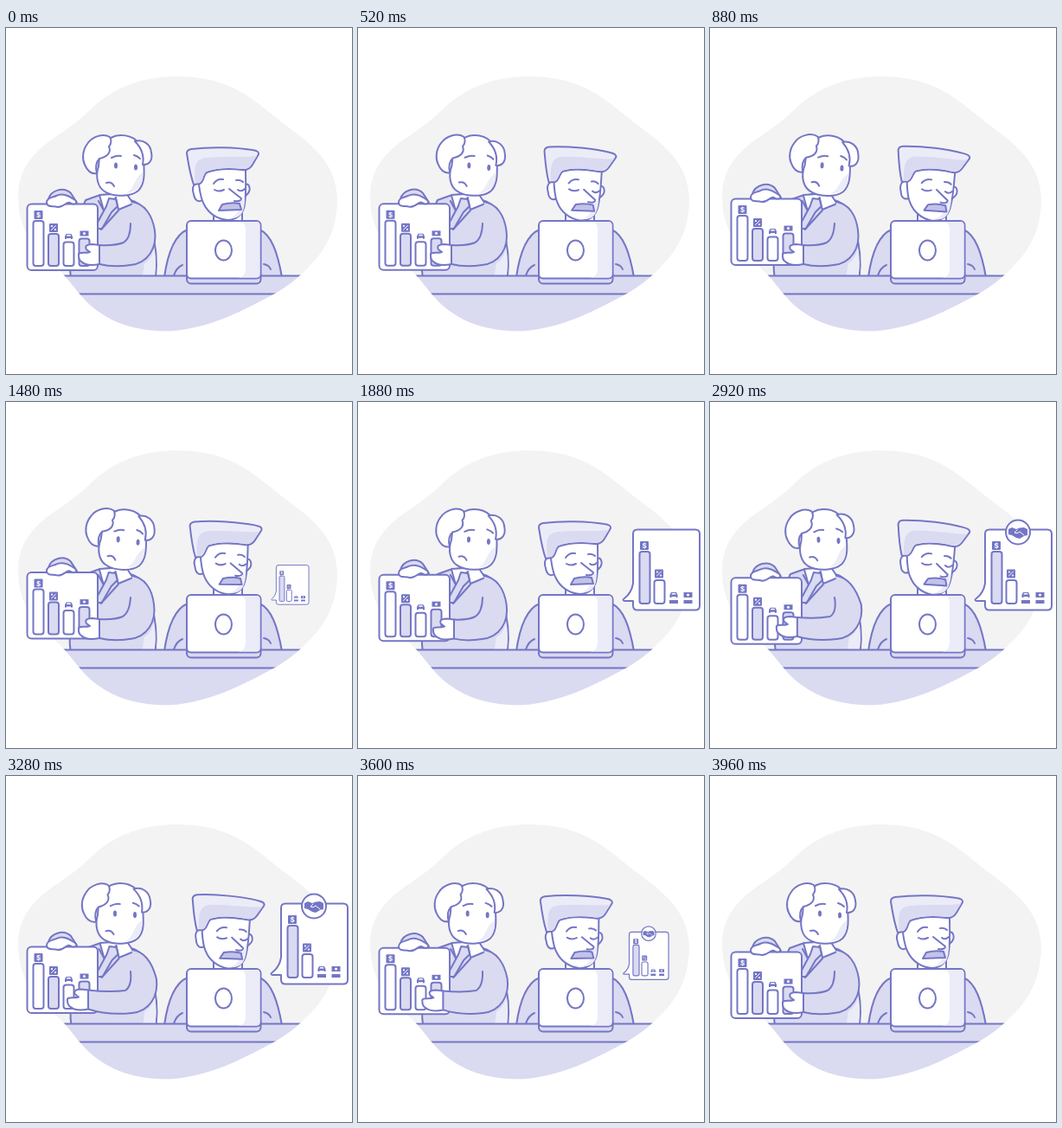
An HTML page for the animation above (4 s loop, 400 px wide and 400 px high).

```html
<!DOCTYPE html>
<html lang="en">
<head>
<meta charset="utf-8">
<title>Budget review</title>
<style>
  html, body { margin: 0; width: 100%; height: 100%; overflow: hidden; background: #fff; }
  svg { display: block; width: 100vw; height: 100vh; fill: #fff; stroke: #7476c5; stroke-width: 2; stroke-linejoin: round; stroke-linecap: round; }
  .tint { fill: #dadaf1; }
  .pale { fill: #ececf8; }
  .shade { fill: #ececf8; stroke: none; }
  .line { fill: none; }
  .solid { fill: #7476c5; stroke: none; }
  .white { fill: #fff; stroke: none; }
  text { font: bold 8px Inter, sans-serif; text-anchor: middle; stroke: none; }
</style>
</head>
<body>
<svg viewBox="0 0 400 400">
  <defs>
    <path id="blob" d="M195 56C240 56 267 67 299 93C328 117 350 130 364 148C378 164 383 182 383 202C382 226 375 246 361 264C346 282 328 298 307 309C272 328 236 346 195 350C154 352 122 342 97 320C82 306 75 292 58 277C34 258 14 235 14 194C14 172 23 155 40 139C58 124 75 116 96 96C122 70 153 57 195 56Z"/>
    <clipPath id="inside"><use href="#blob"/></clipPath>
    <g id="dollar"><rect class="solid" x="-5" y="-5" width="10" height="10" rx="1"/><text y="3">$</text></g>
    <g id="percent"><rect class="solid" x="-5" y="-5" width="10" height="10" rx="1"/><path class="line" d="M-2.5 2.5L2.5-2.5" style="stroke:#fff;stroke-width:1"/><circle class="white" cx="-2" cy="-2" r="1.1"/><circle class="white" cx="2" cy="2" r="1.1"/></g>
    <g id="car"><path class="solid" d="M-4.5 3V0L-3-3H3L4.5 0V3H2.5V2H-2.5V3Z"/><path class="white" d="M-2.6-.5L-1.9-2H1.9L2.6-.5Z"/></g>
    <g id="cash"><rect class="solid" x="-5" y="-3" width="10" height="6"/><circle class="white" r="1.5"/></g>
  </defs>

  <use href="#blob" style="fill:#f3f3f3;stroke:none"/>

  <!-- presenter -->
  <g id="torso">
    <path class="tint" d="M92 199L106 194L120 192L144 199C158 203 164 214 168 234C174 252 175 270 173 288H75C72 272 76 232 92 199Z"/>
    <path class="shade" d="M160 272C166 269 170 262 171 254C174 268 173 278 172 286H158Z"/>
    <path d="M108 193L113 211L127 196L130 210L147 203L139 191Z"/>
    <path class="tint" d="M119 197L127 198L129 206L122 213L111 232H102L116 206Z"/>
    <path class="line" d="M130 211L110 233M107 200L113 211"/>
  </g>
  <g id="oldHead">
    <path d="M107 160C103 172 106 184 114 189C125 196 145 195 153 188C161 180 160 168 159 150C158 132 147 124 133 124C118 124 108 136 107 160Z"/>
    <path class="shade" d="M138 191C149 187 147 174 158 167C159 181 154 190 138 191Z"/>
    <path d="M120 126C112 121 99 126 94 134C88 142 88 152 91 158C94 165 99 169 105 168C103 160 104 155 108 151C117 149 122 144 119 137C122 134 122 129 120 126Z"/>
    <path d="M149 131C158 128 167 134 168 144C170 153 165 159 158 158C160 148 157 139 149 131Z"/>
    <path class="line" d="M122 150Q128 147 133 148M148 147Q152 148 155 151M116 179Q122 177 125 183"/>
    <ellipse class="solid" cx="127" cy="159" rx="2" ry="3.5"/>
    <ellipse class="solid" cx="150" cy="161" rx="2" ry="3.5"/>
  </g>
  <g id="card">
    <path class="tint" d="M49 198C52 187 67 183 75 191L82 202L60 212Z"/>
    <rect x="24.500" y="203.500" width="81.500" height="76.500" rx="5"/>
    <rect x="31.500" y="223" width="12" height="52" rx="3"/>
    <rect class="tint" x="49" y="238" width="12" height="37" rx="3"/>
    <rect x="66.500" y="247.500" width="12" height="27.500" rx="3"/>
    <rect class="tint" x="84.500" y="243.500" width="12" height="31.500" rx="3"/>
    <use href="#dollar" x="37.500" y="216"/><use href="#percent" x="55" y="231"/>
    <use href="#car" x="72.500" y="241"/><use href="#cash" x="90.500" y="237.500"/>
    <path d="M47 202C47 196 54 196 58 194C66 190 74 195 80 199C84 203 78 205 74 202C70 200 68 207 60 207C54 205 48 208 47 202Z"/>
  </g>
  <path id="sleeve" class="tint" style="stroke:none"/>
  <path id="sleeveEdge" class="line"/>
  <path id="hand" d="M84 263C83 258 91 261 97 259L93 256C90 251 96 250 100 250L108 251V273C98 275 91 274 87 270C84 268 84 266 84 263Z"/>

  <!-- listener -->
  <path class="tint" d="M183 288C187 260 195 239 210 233H293C307 239 314 260 319 288Z"/>
  <path class="line" d="M194 286Q197 277 204 274M298 273Q304 274 306 279"/>
  <path d="M240 208V230H273V212Z"/>
  <g id="bossHead">
    <path d="M225 181C218 177 214 184 217 192C218 199 222 202 227 199Z"/>
    <path d="M276 181C281 178 284 187 279 192L275 196Z"/>
    <path d="M222 172C223 183 225 197 229 204C234 214 244 221 256 222C268 222 275 214 276 203C278 190 277 178 277 163H231Z"/>
    <path class="shade" d="M258 220C268 218 269 209 271 200L276 196C276 211 273 221 258 220Z"/>
    <path class="pale" d="M209 145Q209 141 214 140C237 137 266 138 285 141Q293 142 292 146L285 158Q281 165 273 164C258 162 243 163 232 167C228 170 229 178 224 180L217 181C213 170 211 158 209 145Z"/>
    <path class="tint" style="stroke:none" d="M219 179C217 160 218 151 232 150C252 148 274 150 290 148L284 157Q280 163 273 163C258 161 242 162 231 166C227 170 228 178 223 179Z"/>
    <path class="line" d="M240 180Q244 174 251 175M266 176Q271 175 274 178M241 187Q246 190 252 187M268 187Q272 190 276 186M258 186L272 197Q272 201 264 200"/>
    <path class="tint" style="fill:#c3c3ea" d="M250 204Q261 201 270 203L272 210L246 211Z"/>
  </g>

  <g clip-path="url(#inside)">
    <path class="tint" d="M-9 286.500H409V409H-9Z"/>
    <path class="line" d="M0 307.500H400"/>
  </g>
  <rect class="tint" x="209" y="280" width="85.500" height="15.500" rx="5"/>
  <rect x="209" y="223" width="85.500" height="66.500" rx="5"/>
  <path class="shade" d="M272 224H289.500Q293.500 224 293.500 228V284.500Q293.500 288.500 289.500 288.500H268Q277 288 277 279V232Q277 226 272 224Z"/>
  <ellipse cx="251.500" cy="257" rx="9.500" ry="11.500"/>

  <g id="bubble">
    <path d="M323 147.500H390Q395 147.500 395 152.500V235.500Q395 240.500 390 240.500H323Q318 240.500 318 235.500V230H308Q305 229 308 227Q316 221 318 210V152.500Q318 147.500 323 147.500Z"/>
    <rect class="tint" x="325.500" y="173" width="12" height="60" rx="3"/>
    <rect x="342.500" y="206" width="12" height="27" rx="3"/>
    <rect class="solid" x="360" y="229" width="10" height="4"/>
    <rect class="solid" x="376.500" y="229" width="10" height="4"/>
    <use href="#dollar" x="331" y="166"/><use href="#percent" x="348" y="198.500"/>
    <use href="#car" x="365" y="223"/><use href="#cash" x="381.500" y="223"/>
    <g id="deal">
      <circle cx="356" cy="150.500" r="14"/>
      <path class="solid" d="M345 147L349 145L354 147L358 145.500L363 145L367 147V154L363 155L358 158L354 157L349 154L345 153Z"/>
      <path class="line" d="M355 148L352 151Q355 153 358 150L363 154" style="stroke:#fff;stroke-width:1"/>
    </g>
  </g>
</svg>
<script>
const LOOP = 4000, STEP = 40;
const el = id => document.getElementById(id);

// Eased value along [time, value] keys.
function track(t, ...keys) {
  let [t0, v0] = keys[0];
  for (const [t1, v1] of keys) {
    if (t < t1) {
      const u = Math.max(0, (t - t0) / (t1 - t0));
      return v0 + (v1 - v0) * u * u * (3 - 2 * u);
    }
    [t0, v0] = [t1, v1];
  }
  return v0;
}

const move = (id, value) => el(id).setAttribute('transform', value);
const shape = (id, d) => el(id).setAttribute('d', d);

function scaleAt(id, x, y, s) {
  move(id, `translate(${x} ${y}) scale(${s}) translate(${-x} ${-y})`);
  el(id).style.display = s > 0.002 ? '' : 'none';
}

function drawSleeve(x, y, lean) {
  const elbow = 172 + lean, cuff = 108 + x;
  const outer = `M146 201C160 203 169 216 ${elbow} 234C${elbow + 3} 254 ${elbow - 8} 272 ${144 + lean} 274
    Q${124 + x / 2} 277 ${cuff} ${273 + y}`;
  const inner = `${cuff} ${251 + y}Q${126 + x / 2} ${252 + y / 2} ${136 + lean} 248Q${144 + lean} 243 144 226`;
  shape('sleeve', `${outer}L${inner}Z`);
  shape('sleeveEdge', `${outer}M${inner}`);
}

function draw(t) {
  const nod = track(t % 2000, [0, 0], [760, 6], [1040, 6], [1840, 0]);
  move('bossHead', `rotate(${nod} 250 225)`);

  const sway = track(t, [40, 0], [1000, 3.3], [1560, 3.3], [2300, -1.9], [2840, -1.9], [3920, 0]);
  move('oldHead', `rotate(${sway} 131 206)`);
  const lean = sway > 0 ? -sway * 0.3 : -sway * 1.5;
  move('torso', `translate(${lean * 0.3} 0)`);

  const lift = track(t, [480, 0], [960, -6.4], [1560, -6.4], [2300, 0], [2860, 0], [3300, -6], [3460, -6], [3920, 0]);
  move('card', `translate(0 ${lift})`);

  const x = track(t, [1560, 0], [2300, 7.5], [2480, 7.5], [3160, -13], [3440, -13], [3920, 0]);
  const y = track(t, [1560, 0], [2300, 1.5], [2480, 1.5], [3160, -3.5], [3440, -3.5], [3920, 0]);
  move('hand', `translate(${x} ${y})`);
  drawSleeve(x, y, lean);

  scaleAt('bubble', 307, 228, track(t, [1130, 0], [1840, 1], [3350, 1], [3920, 0]));
  scaleAt('deal', 356, 150.5, track(t, [1880, 0], [2280, 1]));
}

function tick(now) {
  draw(Math.floor(now % LOOP / STEP) * STEP);
  requestAnimationFrame(tick);
}
draw(0);
requestAnimationFrame(tick);
</script>
</body>
</html>
```
